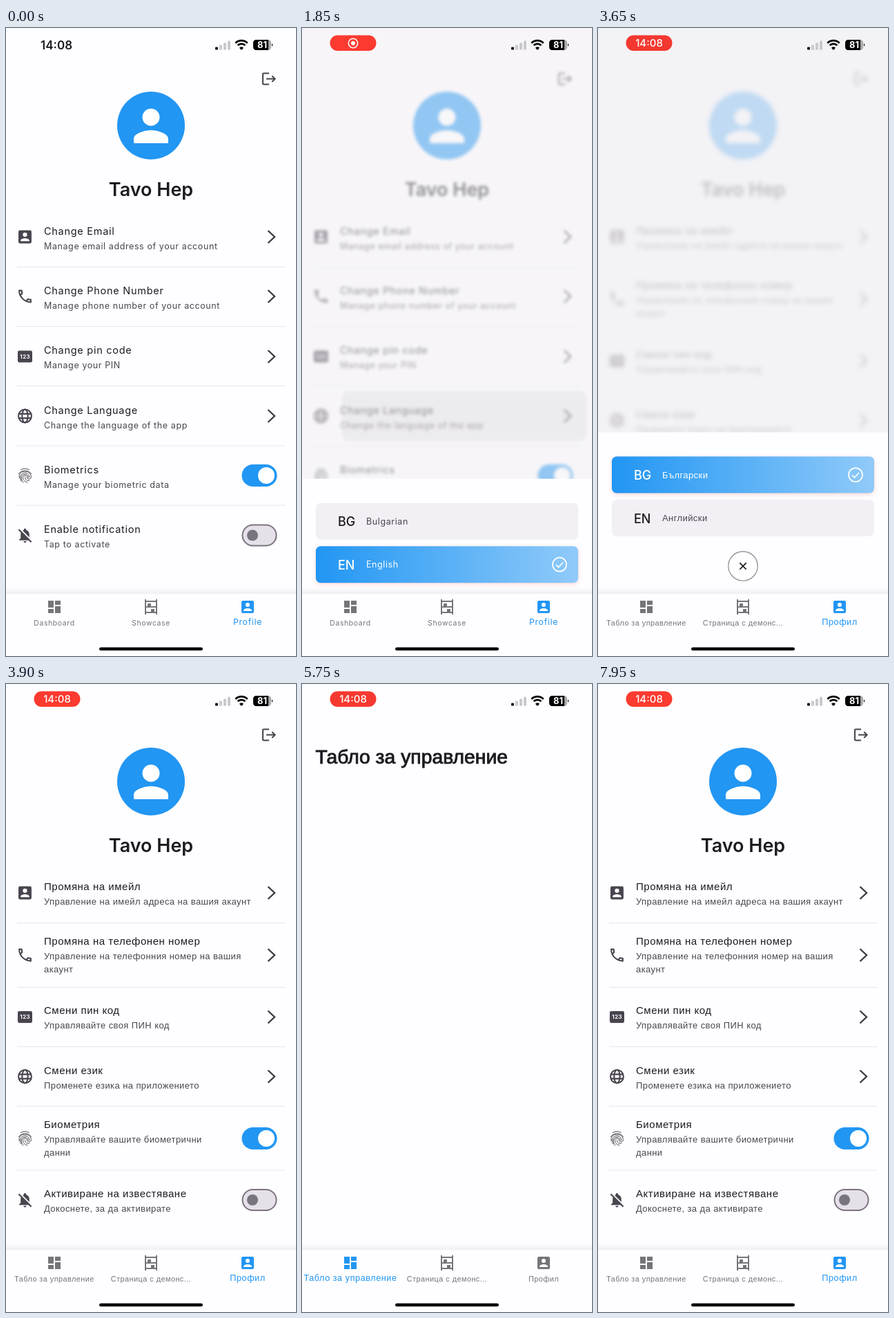
An HTML page that plays this animation: 420x908 px, repeating every 8000 ms.

```html
<!DOCTYPE html>
<html lang="en">
<head>
<meta charset="utf-8">
<title>Profile settings</title>
<style>
html, body { margin: 0; width: 100%; height: 100%; overflow: hidden; background: #fefdff; }
svg { display: block; width: 100vw; height: 100vh; }
text { font-family: Inter, sans-serif; fill: #1d1b20; }
.title { font-size: 14.5px; letter-spacing: .72px; }
.sub { font-size: 12.5px; letter-spacing: .6px; fill: #49454f; }
.label { font-size: 10.5px; letter-spacing: .6px; text-anchor: middle; fill: currentColor; }
.bg text { font-family: "Liberation Sans", Arial, sans-serif; }
.bg .title { font-size: 15px; letter-spacing: .53px; }
.bg .sub { font-size: 13px; letter-spacing: .41px; }
.bg .label { font-size: 10.9px; letter-spacing: .45px; }
.bg .head { font-size: 28.3px; stroke: #1d1b20; stroke-width: .9px; }
text.name, .bg text.name { font: 600 27px Inter, sans-serif; text-anchor: middle; }
text.code, .bg text.code { font: 500 18px Inter, sans-serif; }
text.digits, .bg text.digits { font: 700 7.6px Inter, sans-serif; fill: #fff; text-anchor: middle; letter-spacing: .4px; }
.on text { fill: #fff; }
.line { fill: none; stroke: currentColor; stroke-width: 2; }
.mid { stroke-width: 1.5; }
.fine { stroke-width: .95; stroke-linecap: round; }
.icon { color: #49454f; fill: currentColor; fill-rule: evenodd; }
</style>
</head>
<body>
<svg id="stage" viewBox="0 0 420 908" preserveAspectRatio="none"></svg>
<script>
const BLUE = '#2196f3', LOOP = 8000;
const bell = '<path d="M12 22c1.1 0 2-.9 2-2h-4c0 1.1.9 2 2 2zm6-6v-5c0-3.07-1.64-5.64-4.5-6.32V4a1.5 1.5 0 0 0-3 0v.68C7.63 5.36 6 7.92 6 11v5l-2 2v1h16v-1z"/>';
const star = x => `<path class="line mid" d="M${x} 6.5v7M${x - 3} 8.2l6 3.6M${x + 3} 8.2l-6 3.6"/>`;
const corner = (x, y) => `<path class="line mid" d="M${x} ${y}h4v4h-4z"/>`;
const icons = {
  account: '<path d="M3 5v14a2 2 0 0 0 2 2h14a2 2 0 0 0 2-2V5a2 2 0 0 0-2-2H5a2 2 0 0 0-2 2zm12 4a3 3 0 1 1-6 0 3 3 0 0 1 6 0zm-9 8c0-2 4-3.1 6-3.1s6 1.1 6 3.1v1H6z"/>',
  phone: '<path d="M6.54 5c.06.89.21 1.76.45 2.59l-1.2 1.2A15 15 0 0 1 5.03 5zM16.4 17.02c.85.24 1.72.39 2.6.45v1.49a15 15 0 0 1-3.8-.75zM7.5 3H4a1 1 0 0 0-1 1c0 9.39 7.61 17 17 17a1 1 0 0 0 1-1v-3.49a1 1 0 0 0-1-1c-1.24 0-2.45-.2-3.57-.57-.36-.1-.75-.03-1.02.24l-2.2 2.2a15 15 0 0 1-6.59-6.59l2.2-2.2c.28-.28.36-.67.25-1.02A11 11 0 0 1 8.5 4a1 1 0 0 0-1-1z"/>',
  pin: '<rect x="2" y="4" width="20" height="16" rx="2"/><text class="digits" x="12.2" y="14.8">123</text>',
  globe: '<g class="line"><circle cx="12" cy="12" r="9"/><ellipse cx="12" cy="12" rx="4" ry="9"/><path d="M3.6 9h16.8M3.6 15h16.8"/></g>',
  finger: '<path class="line fine" d="M6.3 4a12 12 0 0 1 11.4 0M3.3 9.8a10.5 10.5 0 0 1 17.4 0M4.2 15.5C2.8 9.5 7 6.3 12 6.3s9 3.600 8.300 8.700c-.5 2.600-5.300 2.500-5.500-.5s-5.400-3.500-5.600 0c0 4 3 6.400 6 7M6.600 19.600c-3-7 .9-11.200 5.400-11.200s6 3.800 6 6M9.700 21.700c-4.200-4-3.600-11 2.300-11.200 4 .2 4 3 4.500 4.500M12 14.500c0 3.500 2.500 5 6 4.500"/>',
  bell,
  mute: bell + '<path d="M4.6 2.8l17 17" stroke="#fefdff" stroke-width="2"/><path class="line" d="M3.3 4l17.4 17.3"/>',
  calc: '<path d="M5 3h14a2 2 0 0 1 2 2v14a2 2 0 0 1-2 2H5a2 2 0 0 1-2-2V5a2 2 0 0 1 2-2z"/><path d="M6.2 8.5h5M13.5 6.5l4 4M17.5 6.5l-4 4M8.7 13.5v5M6.2 16h5M13 14.8h5M13 17.3h5" stroke="#fff" stroke-width="1.4"/>',
  widgets: '<path d="M13 13v8h8v-8zM3 21h8v-8H3zM3 3v8h8V3zm13.66-1.31L11 7.34 16.66 13l5.66-5.66z"/>',
  scan: corner(5.5, 5.5) + corner(14.5, 5.5) + corner(5.5, 14.5) +
    '<path class="line mid" d="M2 7V2h5M17 2h5v5M2 17v5h5M22 17v5h-5"/><path d="M13 13h2v2h-2zM15 15h2v2h-2zM17 13h2v2h-2zM13 17h2v2h-2zM17 17h2v2h-2z"/>',
  link: '<path d="M3.9 12A3.1 3.1 0 0 1 7 8.9h4V7H7a5 5 0 0 0 0 10h4v-1.9H7A3.1 3.1 0 0 1 3.9 12zM8 13h8v-2H8zm9-6h-4v1.9h4a3.1 3.1 0 0 1 0 6.2h-4V17h4a5 5 0 0 0 0-10z"/>',
  password: '<path d="M2 17h20v2H2z"/>' + star(4.5) + star(12) + star(19.5),
  logout: '<path d="M17 7l-1.41 1.41L18.17 11H8v2h10.17l-2.58 2.58L17 17l5-5zM4 5h8V3H4a2 2 0 0 0-2 2v14a2 2 0 0 0 2 2h8v-2H4z"/>',
  person: '<path d="M12 12a4 4 0 1 0 0-8 4 4 0 0 0 0 8zm0 2c-2.67 0-8 1.34-8 4v2h16v-2c0-2.66-5.33-4-8-4z"/>',
  dashboard: '<path d="M3 13h8V3H3zm0 8h8v-6H3zm10 0h8V11h-8zm0-18v6h8V3z"/>',
  shelves: '<path class="line" d="M4 1v22M20 1v22M4 4h16M4 12h16M4 20h16"/><path d="M7 7h5v5H7zM12 15h5v5h-5z"/>'
};
const icon = (name, x, y, scale = 1.05, color = '') =>
  `<g class="icon" style="color:${color}" transform="translate(${x} ${y}) scale(${scale}) translate(-12 -12)">${icons[name]}</g>`;
const text = (cls, x, y, s) => `<text class="${cls}" x="${x}" y="${y}">${s}</text>`;
const arrow = y => `<path d="M379.5 ${y - 9}l9.5 9-9.5 9" fill="none" stroke="#3c393f" stroke-width="2.3"/>`;
const toggle = (y, on) => on
  ? `<rect x="341.5" y="${y - 16}" width="51" height="32" rx="16" fill="${BLUE}"/><circle cx="377" cy="${y}" r="12" fill="#fff"/>`
  : `<rect x="342.5" y="${y - 15}" width="49" height="30" rx="15" fill="#e6e0e9" stroke="#79747e" stroke-width="2"/><circle cx="357" cy="${y}" r="8" fill="#79747e"/>`;

// row: [icon, centre y, title y, title, subtitle lines...]
const row = ([name, y, ty, title, ...lines]) => {
  const end = name == 'finger' ? toggle(y, true) : name == 'mute' ? toggle(y, false) : arrow(y);
  return icon(name, 27.5, y) + text('title', 55, ty + 5.5, title) +
    lines.map((s, i) => text('sub', 55, ty + 26.6 + i * 19.2, s)).join('') + end;
};
const profile = (rows, rules) =>
  icon('logout', 381, 73.5, 1) + `<circle cx="210" cy="141" r="49" fill="${BLUE}"/>` +
  icon('person', 210, 141.5, 3.12, '#fff') + text('name', 210, 243, 'Tavo Hep') +
  rules.map(y => `<path d="M16 ${y}H405" stroke="#e9e6ec"/>`).join('') + rows.map(row).join('');

const pages = {
  en: profile([
    ['account', 302, 293, 'Change Email', 'Manage email address of your account'],
    ['phone', 388, 379, 'Change Phone Number', 'Manage phone number of your account'],
    ['pin', 475, 465.5, 'Change pin code', 'Manage your PIN'],
    ['globe', 561, 552, 'Change Language', 'Change the language of the app'],
    ['finger', 647, 638, 'Biometrics', 'Manage your biometric data'],
    ['mute', 733.5, 724, 'Enable notification', 'Tap to activate']
  ], [345.5, 431.5, 517.5, 604, 690]),
  bg: profile([
    ['account', 302, 292, 'Промяна на имейл', 'Управление на имейл адреса на вашия акаунт'],
    ['phone', 392, 371.5, 'Промяна на телефонен номер', 'Управление на телефонния номер на вашия', 'акаунт'],
    ['pin', 481.5, 471.5, 'Смени пин код', 'Управлявайте своя ПИН код'],
    ['globe', 567.5, 558, 'Смени език', 'Променете езика на приложението'],
    ['finger', 657, 636.5, 'Биометрия', 'Управлявайте вашите биометрични', 'данни'],
    ['mute', 746, 736, 'Активиране на известяване', 'Докоснете, за да активирате']
  ], [345.5, 438.5, 524.5, 610.5, 703]),
  showcase: text('head', 19.5, 115, 'Страница с демонстрации') + [
    ['bell', 183, 162.5, 'Примерно известие', 'Демонстрира функционалността на', 'известията'],
    ['calc', 261, 240.5, 'Демонстрация на брояч', 'Демонстрация на елементарна', 'функционалност на брояч.'],
    ['widgets', 339, 319, 'Демонстрация на компоненти', 'Демонстрира различни преизползваеми', 'компоненти.'],
    ['scan', 418, 397.5, 'Демонстрация на четец на QR', 'Показва функционалността за четене на QR', 'кодове.'],
    ['link', 492, 482, 'Демонстрация на Deep Link-ове', 'Демонстрира възможностите на deep link.'],
    ['pin', 563, 553, 'Многофакторна автентикация', 'Демонстрира многофакторна автентикация.'],
    ['password', 637.5, 617, 'Демонстрация на еднократна парола', 'Демонстрира функционалност за', 'автентикация с еднократна парола.']
  ].map(row).join(''),
  dashboard: text('head', 19.5, 115, 'Табло за управление')
};

const words = {
  en: ['Bulgarian', 'English', 'Dashboard', 'Showcase', 'Profile'],
  bg: ['Български', 'Английски', 'Табло за управление', 'Страница с демонс...', 'Профил']
};
const card = (i, on) => {
  const y = 616 + i * 62.5;
  return `<g id="card${i}${on}" class="${on ? 'on' : ''}">
    <rect x="20" y="${y}" width="380" height="53" rx="7" fill="${on ? 'url(#blue)' : '#f2f0f5'}" ${on ? 'style="filter:drop-shadow(0 2px 3px rgba(255,80,60,.2))"' : ''}/>
    ${text('code', 52, y + 33.5, ['BG', 'EN'][i])}<text class="sub word${i}" x="93" y="${y + 31}"/>
    ${on ? `<g fill="none" stroke="#fff" stroke-width="1.7"><circle cx="373" cy="${y + 26.5}" r="10"/><path d="M368 ${y + 27}l3.5 3.5 6.5-7"/></g>` : ''}</g>`;
};
const tab = (name, i) => `<g id="tab${i}">${icon(name, 70 + i * 140, 837, 1, 'inherit')}
  <g id="label${i}"><text class="label word${i + 2}"/></g></g>`;
const bar = (i, h) => `<rect x="${303 + i * 6}" y="${31.5 - h}" width="4" height="${h}" rx="1" fill="${i ? '#c9c8cb' : '#111'}"/>`;
const wifi = r => `<path d="M${341 - r * .72} ${30.5 - r * .72}A${r} ${r} 0 0 1 ${341 + r * .72} ${30.5 - r * .72}" fill="none" stroke="#000" stroke-width="2.7"/>`;

document.getElementById('stage').innerHTML = `
<defs>
  <linearGradient id="blue"><stop stop-color="${BLUE}"/><stop offset="1" stop-color="#90caf9"/></linearGradient>
  <linearGradient id="shade" x2="0" y2="1"><stop stop-color="#000" stop-opacity="0"/><stop offset="1" stop-color="#000" stop-opacity=".06"/></linearGradient>
  <clipPath id="body"><path d="M0 0h420v818H0z"/></clipPath>
  <clipPath id="foot"><path d="M0 818h420v90H0z"/></clipPath>
</defs>
<rect width="420" height="908" fill="#fefdff"/>
<g clip-path="url(#body)">
  <g id="page">
    <rect id="press" y="525" height="72" rx="9"/>
    ${Object.keys(pages).map(k => `<g id="${k}" class="${k == 'en' ? 'en' : 'bg'}">${pages[k]}</g>`).join('')}
  </g>
  <rect id="veil" width="420" height="818" fill="#f0eff2"/>
  <g id="sheet">
    <path d="M0 581h420v240H0z" fill="#fefdff"/>
    <g id="cards">${[0, 1].map(i => card(i, 0) + card(i, 1)).join('')}</g>
    <circle cx="210" cy="774.5" r="21.2" fill="#fff" stroke="#8b898d" stroke-width="1.2"/>
    <path d="M205.3 769.8l9.4 9.4m0-9.4l-9.4 9.4" stroke="#111" stroke-width="1.6"/>
  </g>
</g>
<rect y="809" width="420" height="9" fill="url(#shade)"/>
<g id="nav">
  <rect y="818" width="420" height="90" fill="#fefdff"/>
  <circle id="ripple" cy="858" clip-path="url(#foot)"/>
  ${['dashboard', 'shelves', 'account'].map(tab).join('')}
  <rect x="135" y="895.5" width="150" height="4.5" rx="2.2"/>
</g>
<text id="clock" x="73" y="31" text-anchor="middle" font-size="17" font-weight="600">14:08</text>
<g id="pill">
  <rect id="red" x="40.5" y="10.5" width="67" height="22.5" rx="11.2"/>
  <g id="dot"><circle cx="74" cy="22" r="6.7" fill="none" stroke="#fff" stroke-width="1.5"/><circle cx="74" cy="22" r="3" fill="#fff"/></g>
  <text id="time" x="74" y="27.3" text-anchor="middle" font-size="15" font-weight="500" style="fill:#fff">14:08</text>
</g>
${[4, 7, 10, 13].map((h, i) => bar(i, h)).join('')}
${wifi(12)}${wifi(7.5)}<path d="M341 32l-3-3.3a4.5 4.5 0 0 1 6 0z"/>
<rect x="358" y="17" width="26" height="15" rx="4.5" fill="#a9a8ab"/>
<path d="M362.5 17H380v15h-17.5a4.5 4.5 0 0 1-4.5-4.5v-6a4.5 4.5 0 0 1 4.5-4.5zM385 22.3q2.5 2.2 0 4.4z"/>
<text x="371" y="29.2" text-anchor="middle" font-size="13" font-weight="700" style="fill:#fff">81</text>`;

const $ = id => document.getElementById(id);
const set = (id, attrs) => { for (const k in attrs) $(id).setAttribute(k, attrs[k]); };
const ramp = (t, a, b) => Math.min(1, Math.max(0, (t - a) / (b - a)));
const easeOut = x => 1 - (1 - x) ** 2;
const mix = (a, b, p) => `rgb(${a.map((v, i) => Math.round(v + (b[i] - v) * p))})`;

// cubic-bezier(x1, 0, .2, 1)
const bezier = (x1, x) => {
  let lo = 0, hi = 1, u;
  for (let i = 0; i < 20; i++) {
    u = (lo + hi) / 2;
    3 * u * (1 - u) * (1 - u) * x1 + .6 * u * u * (1 - u) + u ** 3 < x ? lo = u : hi = u;
  }
  return u * u * (3 - 2 * u);
};

const SWAP = 2600;
const taps = [[4510, 1], [5300, 0], [6650, 1], [7350, 2]];
const tabPages = ['dashboard', 'showcase', 'bg'];
let lang;

function setLang(next) {
  if (next == lang) return;
  lang = next;
  words[lang].forEach((s, i) => document.querySelectorAll('.word' + i).forEach(e => e.textContent = s));
  set('cards', { class: lang });
  set('nav', { class: lang });
}

function drawNav(t) {
  let current = 2, previous = 2, since = -1000;
  for (const [at, i] of taps) if (t >= at) [previous, current, since] = [current, i, at];
  const p = bezier(.4, ramp(t, since, since + 200));
  for (let i = 0; i < 3; i++) {
    const on = i == current ? p : i == previous ? 1 - p : 0;
    $('tab' + i).style.color = mix([117, 117, 121], [33, 150, 243], on);
    set('label' + i, { transform: `translate(${70 + i * 140} ${863.5 - on}) scale(${1 + on / 6})` });
  }
  const tap = taps.find(([at]) => t >= at - 100 && t < at + 430);
  const [at, i] = tap || [LOOP * 2, 0];
  set('ripple', {
    cx: 70 + i * 140,
    r: 80 * easeOut(ramp(t, at - 100, at + 230)),
    opacity: .095 * ramp(t, at - 100, at - 25) * (1 - ramp(t, at + 130, at + 430))
  });
  const shown = t < SWAP ? 'en' : tabPages[current];
  for (const k in pages) $(k).style.display = k == shown ? '' : 'none';
}

function drawSheet(t) {
  const open = t < 3000 ? bezier(0, ramp(t, 1764, 2014)) : bezier(0, 1 - ramp(t, 3610, 3860));
  const visible = open > .001;
  $('page').style.filter = visible ? `blur(${3.1 * open}px)` : 'none';
  set('veil', { opacity: .78 * open });
  set('sheet', { transform: `translate(0 ${237 * (1 - open)})` });
  $('sheet').style.display = visible ? '' : 'none';
  const bg = ramp(t, 2450, 2600);
  set('card01', { opacity: bg });
  set('card00', { opacity: 1 - bg });
  set('card11', { opacity: 1 - bg });
  set('card10', { opacity: bg });
  set('cards', { opacity: 1 - .5 * (ramp(t, 2500, 2650) - ramp(t, 2950, 3150)) });
  const half = 177 * easeOut(ramp(t, 1450, 1800));
  set('press', { x: 235 - half, width: 2 * half, opacity: .09 * ramp(t, 1450, 1550) * (1 - ramp(t, 1880, 2150)) });
}

function drawPill(t) {
  const q = ramp(t, 50, 500) - 1;
  const scale = 1 + q * q * (2.4 * q + 1.4);
  set('pill', { transform: `translate(74 22) scale(${scale}) translate(-74 -22)`, opacity: ramp(t, 50, 200) });
  set('clock', { opacity: 1 - ramp(t, 50, 200) });
  const glow = (1 + Math.cos((t - 4075) / 2020 * 2 * Math.PI)) / 2;
  set('red', { fill: mix([222, 52, 47], [255, 59, 48], glow) });
  const time = ramp(t, 3150, 3350);
  set('dot', { opacity: 1 - time });
  set('time', { opacity: time });
}

function frame(now) {
  const t = now % LOOP;
  setLang(t < SWAP ? 'en' : 'bg');
  drawNav(t);
  drawSheet(t);
  drawPill(t);
  requestAnimationFrame(frame);
}
frame(0);
</script>
</body>
</html>
```
